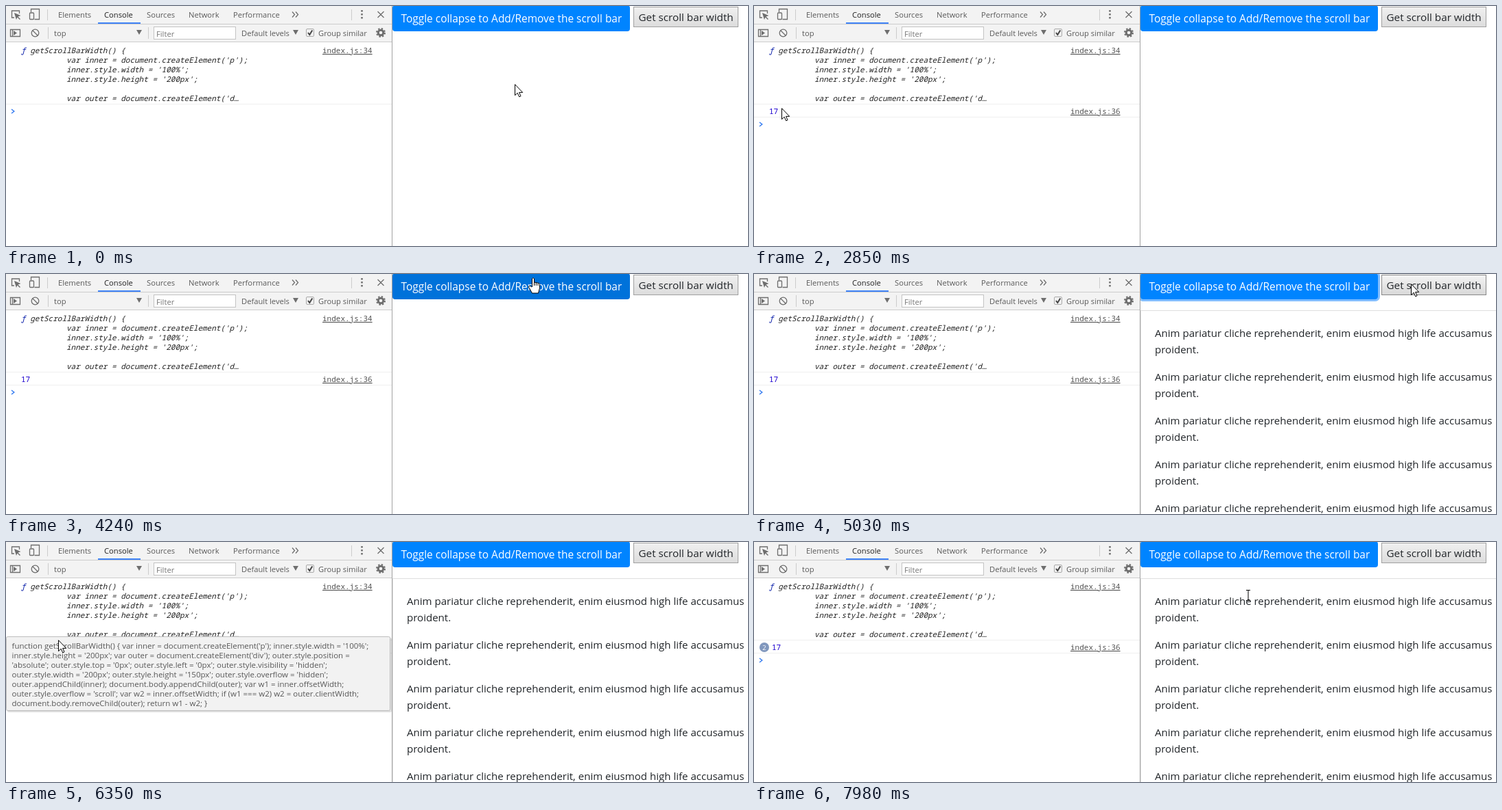
Write an HTML page that moves like this. It is 1081 px wide and 351 px high and loops after 8 s.

```html
<!DOCTYPE html>
<html lang="en">
<head>
<meta charset="utf-8">
<title>Scroll bar width</title>
<style>
html, body { margin: 0; height: 100%; overflow: hidden; background: #fff }
svg { display: block }
text { font-family: "Open Sans", "Noto Sans", sans-serif; white-space: pre }
.ui { font-size: 11.2px; fill: #5a5a5a }
.page { font-size: 15.05px; fill: #212529 }
.code, .code text { font: 11px "Noto Sans Mono", "DejaVu Sans Mono", monospace; fill: #222 }
.fn text { font-style: italic }
.code .link { fill: #545454; text-decoration: underline }
.code .num { fill: #1c00cf }
.tip { font-size: 11.5px; fill: #575757 }
.line { stroke: #ccc }
.icon { fill: none; stroke: #6e6e6e; stroke-width: 1.3 }
.solid { fill: #6e6e6e }
.cursor { fill: #fff; stroke: #000; stroke-linejoin: round }
</style>
</head>
<body>
<svg width="1081" height="351">
<defs>
  <linearGradient id="face" x2="0" y2="1"><stop stop-color="#f0f0f0"/><stop offset="1" stop-color="#dcdcdc"/></linearGradient>
  <linearGradient id="faceOver" x2="0" y2="1"><stop stop-color="#f4f4f4"/><stop offset="1" stop-color="#d8d8d8"/></linearGradient>
  <linearGradient id="faceDown" x2="0" y2="1"><stop stop-color="#d2d2d2"/><stop offset="1" stop-color="#e2e2e2"/></linearGradient>
</defs>

<!-- developer tools -->
<rect width="562" height="52" fill="#f3f3f3"/>
<path class="line" d="M0 26.5h562M0 52.5h562M60.5 5v16M503.5 5v16M61.5 31v17M207.5 31v17"/>
<rect x="134" y="24" width="62" height="2" fill="#3e82f7"/>
<rect x="215.5" y="30.5" width="119" height="18" fill="#fff" stroke="#c4c4c4"/>
<g class="ui">
  <text x="76" y="17">Elements</text>
  <text x="143" y="17" fill="#222">Console</text>
  <text x="205" y="17">Sources</text>
  <text x="266" y="17">Network</text>
  <text x="331" y="17">Performance</text>
  <text x="70" y="44">top</text>
  <text x="219" y="45" fill="#777">Filter</text>
  <text x="343" y="44">Default levels</text>
  <text x="455" y="44">Group similar</text>
</g>
<path class="solid" d="M190 35h8l-4 7zM418 35h8l-4 7zM11 36l5 3.5-5 3.5zM12 10l9.5 4-4 1.500 3.500 3.500-1 1-3.500-3.500-1.500 3.500z"/>
<path stroke="#6e6e6e" stroke-width="2.5" stroke-dasharray="2.5" d="M518.5 6v12.500"/>
<g class="icon">
  <path d="M12 17H8.5V7H19.5v4M36.5 9V4.5h12v15h-7"/>
  <rect x="34.5" y="10" width="6" height="9.5" rx="1"/>
  <path d="M417 8.5l3.5 4-3.5 4M422 8.5l3.5 4-3.5 4M541.5 8l9 9M550.5 8l-9 9"/>
  <path d="M6.5 34.5h14v10h-14zM9.500 34v11M38.8 35.800l7.400 7.400"/>
  <circle cx="42.5" cy="39.5" r="5.3"/>
  <circle cx="546" cy="39" r="3.8" stroke-width="3"/>
  <circle cx="546" cy="39" r="6" stroke-width="2" stroke-dasharray="2.36"/>
</g>
<rect x="437.5" y="33.5" width="11" height="11" rx="1.5" fill="#f1f1f1" stroke="#aaa"/>
<path d="M440 39l2.3 3 4-6.5" fill="none" stroke="#444" stroke-width="2"/>

<g class="code fn">
  <text x="22" y="69"><tspan fill="#0d22aa">ƒ</tspan> getScrollBarWidth() {</text>
  <g id="body"></g>
</g>
<rect y="143" width="562" height="1" fill="#f0f0f0"/>
<g class="code">
  <text class="link" x="461" y="69">index.js:34</text>
  <g id="log">
    <rect y="162" width="562" height="1" fill="#f0f0f0"/>
    <text id="num" class="num" y="158">17</text>
    <text class="link" x="461" y="158">index.js:36</text>
  </g>
</g>
<g id="badge">
  <circle cx="15" cy="154" r="7" fill="#8097bd"/>
  <text x="15" y="157.5" font-size="9.5" fill="#fff" text-anchor="middle">2</text>
</g>
<path id="prompt" d="M8 151l3.8 3-3.8 3" fill="none" stroke="#367cf1" stroke-width="1.5"/>
<rect x="562" width="1" height="351" fill="#a3a3a3"/>

<!-- web page -->
<svg x="563" width="518" height="351">
  <rect id="ring" x="-1.5" y="-2.5" width="349" height="41" rx="5.5" fill="none" stroke="#80bdff" stroke-width="3"/>
  <rect id="toggle" y="-1" width="346" height="38" rx="4"/>
  <text x="12.5" y="24" font-size="15.45" fill="#fff">Toggle collapse to Add/Remove the scroll bar</text>
  <rect id="get" x="351.5" y="1.5" width="152" height="29"/>
  <text x="358.5" y="22" font-size="15.25" fill="#212529">Get scroll bar width</text>
  <svg id="card" y="53" width="518" height="0">
    <path fill="#dfdfdf" d="M0 0h518v1H1v297H0z"/>
    <g id="paras"></g>
  </svg>
</svg>

<g id="tip">
  <rect x="2" y="140" width="560" height="109" rx="2" fill="#000" opacity=".13"/>
  <rect x=".5" y="138.5" width="559" height="108" rx="2" fill="#f2f2f2" stroke="#bebebe"/>
</g>

<!-- arrow, hand, text beam -->
<g id="cursor" class="cursor">
  <path d="M.5.7v16l3.7-3.5 2.5 5.600 2.300-1-2.400-5.400h5.100z"/>
  <path d="M-1.5 13V1q1.5-3 3 0v5l7 1.500q1 .5 1 2v5l-2 7.500h-9l-5-9q1-3.500 4 0M1.5 6v5M4.200 7v4M7 8v3"/>
  <path d="M-3-7.5H3M0-7V7M-3 7.5H3" fill="none"/>
</g>
</svg>

<script>
const $ = id => document.getElementById(id);
const write = (id, cls, x, y, step, lines) => lines.forEach((s, i) =>
  $(id).innerHTML += `<text class="${cls}" x="${x}" y="${y + step * i}">${s}</text>`);

write('body', '', 88, 83, 14, [
  "var inner = document.createElement('p');",
  "inner.style.width = '100%';",
  "inner.style.height = '200px';",
  "",
  "var outer = document.createElement('d…"
]);
write('tip', 'tip', 8.5, 156, 14, [
  "function getScrollBarWidth() { var inner = document.createElement('p'); inner.style.width = '100%';",
  "inner.style.height = '200px'; var outer = document.createElement('div'); outer.style.position =",
  "'absolute'; outer.style.top = '0px'; outer.style.left = '0px'; outer.style.visibility = 'hidden';",
  "outer.style.width = '200px'; outer.style.height = '150px'; outer.style.overflow = 'hidden';",
  "outer.appendChild(inner); document.body.appendChild(outer); var w1 = inner.offsetWidth;",
  "outer.style.overflow = 'scroll'; var w2 = inner.offsetWidth; if (w1 === w2) w2 = outer.clientWidth;",
  "document.body.removeChild(outer); return w1 - w2; }"
]);
const sentence = 'Anim pariatur cliche reprehenderit, enim eiusmod high life accusamus';
write('paras', 'page', 21, 39, 64, Array(5).fill(sentence));
write('paras', 'page', 21, 63, 64, Array(5).fill('proident.'));

// pointer moves: start, end, x, y
const moves = [
  [213, 1220, 944, 16], [1843, 2850, 40, 149], [2943, 3320, 4, 148],
  [3473, 4240, 768, 6], [4640, 5030, 957, 14], [5813, 6350, 76, 143],
  [6350, 6580, 51, 155], [6673, 7130, 8, 147], [7203, 7980, 720, 78]
];
const clamp = u => Math.min(1, Math.max(0, u));
const smooth = u => u * u * (3 - 2 * u);
const between = (t, a, b) => t >= a && t < b;
const show = (id, on) => $(id).setAttribute('visibility', on ? 'visible' : 'hidden');

function pointer(t) {
  let x = 741, y = 114;
  for (const [start, end, toX, toY] of moves) {
    const u = smooth(clamp((t - start) / (end - start)));
    x += (toX - x) * u;
    y += (toY - y) * u;
  }
  return [Math.round(x), Math.round(y)];
}

// the screen refreshes about 13 times a second
const TICK = 77.68, PHASE = 57;
const refresh = t => Math.max(0, PHASE + TICK * Math.floor((t - PHASE) / TICK + .15));

function draw(now) {
  const t = refresh(now % 8000);
  const [x, y] = pointer(t);
  const overToggle = between(x, 563, 909) && y < 37;
  const overGet = between(x, 914, 1067) && y < 31;
  const overText = t > 7000 && x > 583 && y > 74;
  const pressed = between(t, 1580, 1740) || between(t, 5700, 5780);
  const logged = t > 1740, twice = t > 5780;

  const shape = overToggle ? 1 : overText ? 2 : 0;
  [...$('cursor').children].forEach((c, i) => c.setAttribute('visibility', i === shape ? 'visible' : 'hidden'));
  $('cursor').setAttribute('transform', `translate(${x} ${y})`);

  $('toggle').setAttribute('fill', between(t, 4390, 4470) ? '#006acc' : overToggle ? '#0072da' : '#0084ff');
  show('ring', between(t, 4390, 5700));
  $('get').setAttribute('fill', `url(#face${pressed ? 'Down' : overGet ? 'Over' : ''})`);
  $('get').setAttribute('stroke', overGet ? '#888' : '#a0a0a0');
  $('card').setAttribute('height', 640 * smooth(clamp((t - 4450) / 350)));

  show('log', logged);
  show('badge', twice);
  $('num').setAttribute('x', twice ? 26 : 22);
  $('prompt').setAttribute('transform', `translate(0 ${logged ? 19 : 0})`);
  show('tip', between(t, 6320, 6400));
}

const start = performance.now();
(function frame() {
  draw(performance.now() - start);
  requestAnimationFrame(frame);
})();
</script>
</body>
</html>
```
